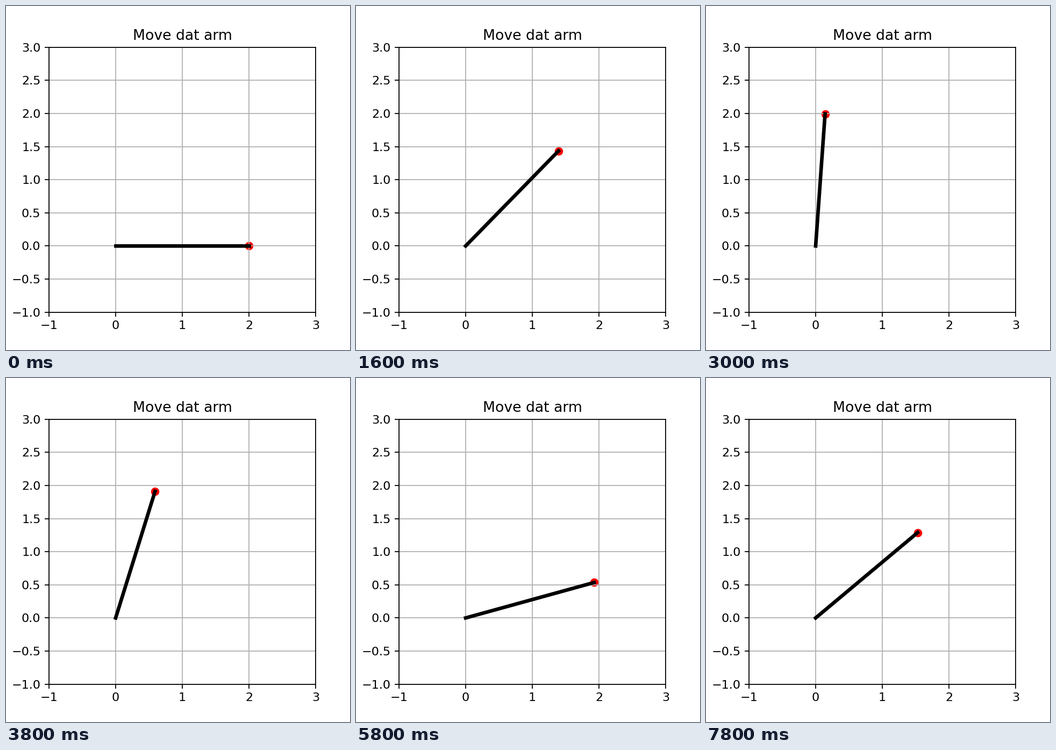
These frames come from a looping animation (640 px wide and 640 px high, 8000 ms). A matplotlib script:

```python
import numpy as np
import matplotlib.pyplot as plt
from matplotlib.animation import FuncAnimation

FRAMES, INTERVAL = 40, 200
STEP = 0.1          # radians per frame
HALF = 16           # frames per sweep
LENGTH = 2


def arm_angle(i):
    """Swing up from 0, then back down from a right angle."""
    k = i % (2 * HALF)
    return STEP * k if k < HALF else np.pi / 2 - STEP * (k - HALF)


fig, ax = plt.subplots(figsize=(4, 4), dpi=160)
ax.set(xlim=(-1, 3), ylim=(-1, 3), title="Move dat arm")
ax.set_xticks(np.arange(-1, 4))
ax.set_yticks(np.arange(-1, 3.5, 0.5))
ax.grid(True)

arm, = ax.plot([0, LENGTH], [0, 0], color="black", linewidth=3)
# The hand keeps the default scatter layer, below the grid lines.
hand = ax.scatter([LENGTH], [0], color="red")


def update(i):
    a = arm_angle(i)
    x, y = LENGTH * np.cos(a), LENGTH * np.sin(a)
    arm.set_data([0, x], [0, y])
    hand.set_offsets([[x, y]])
    return arm, hand


anim = FuncAnimation(fig, update, frames=FRAMES, interval=INTERVAL,
                     repeat=True, repeat_delay=0)
plt.show()
```
